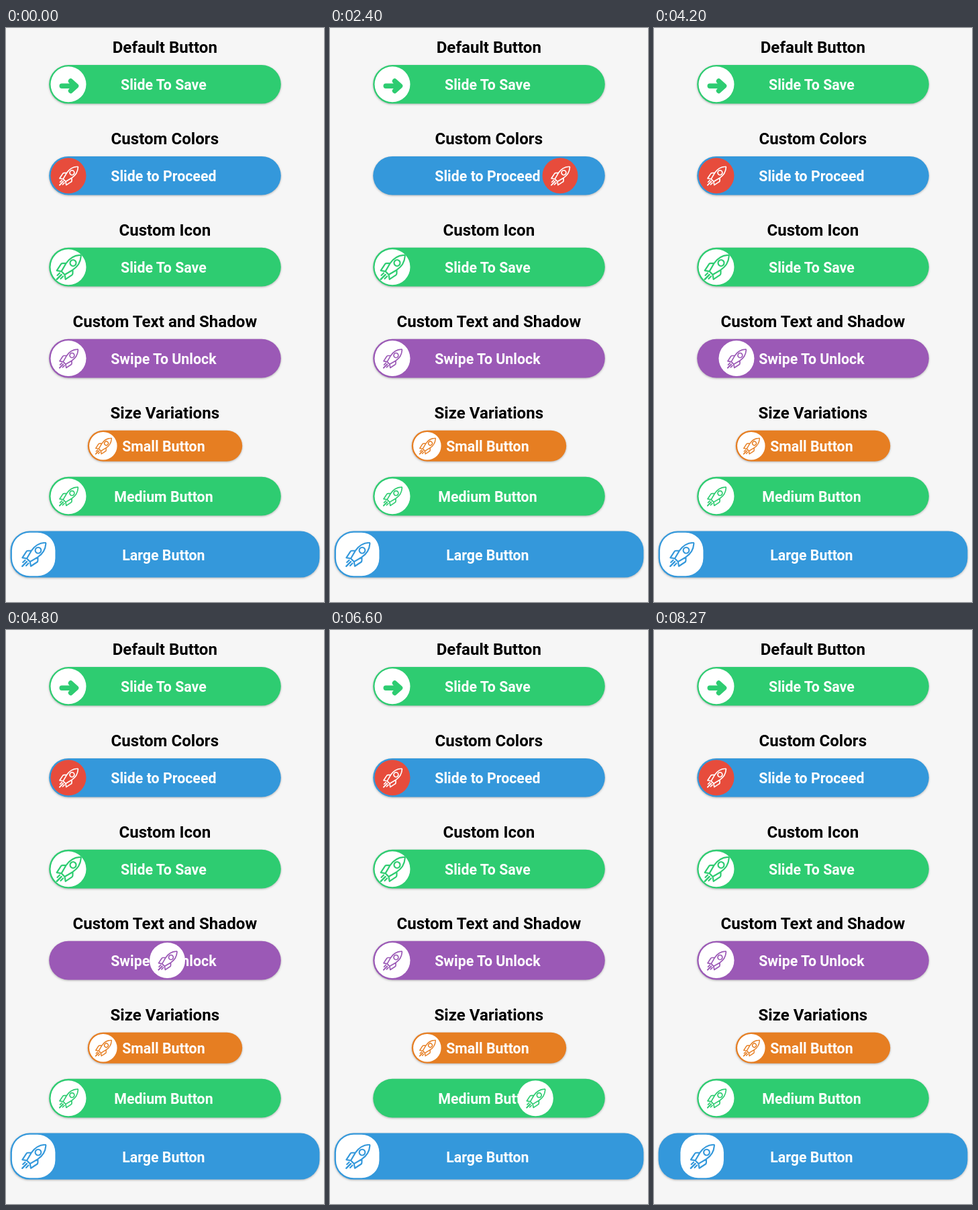
Write an HTML page that moves like this. It is 474 by 854 pixels and loops after 8330 ms.

```html
<!DOCTYPE html>
<html lang="en">
<head>
<meta charset="utf-8">
<title>Slide buttons</title>
<style>
  html, body { margin: 0; height: 100%; overflow: hidden; background: #f6f6f6; }
  svg { display: block; }
  text { font: 700 21.35px Roboto, sans-serif; text-anchor: middle; fill: #fff; }
  .title { font-size: 24.1px; fill: #000; }
  .track { filter: drop-shadow(0 1.5px 1.5px rgba(0, 0, 0, .28)); }
  .icon { fill: none; stroke-linecap: round; stroke-linejoin: round; }
</style>
</head>
<body>
<svg id="stage" width="474" height="854" viewBox="0 0 474 854"></svg>
<script>
const LOOP = 8330, STEP = 1000 / 15;
const UNIT = 1.152, GAP = 20 * UNIT, TITLE = 48 * UNIT;
const GREEN = '#2ecc71', BLUE = '#3498db', PURPLE = '#9b59b6', ORANGE = '#e67e22', RED = '#e74c3c';

const ARROW = '<path stroke-width="7.4" d="M-10.3 2H10M3-5.3L11.1 2L3 9.3"/>';

// half of the upright rocket, mirrored and tilted
const HALF = `<path d="M0-25.3Q.7-25.3 1.2-24.6C7-18 8.5-9 7-1.5L3.5 12H0
  M7-1.5L10.7 2.3Q12 3.6 11.4 5.4L9.2 16L3.5 12M3.5 15.5V20.5M0 15.5V25.3"/>`;
const ROCKET = `<g stroke-width="2.2" transform="rotate(45)">
  <circle cy="-9.2" r="4.5"/>${HALF}<g transform="scale(-1 1)">${HALF}</g></g>`;

// start, drag, hold and back count steps; rest is where the knob waits for the next turn
const buttons = [
  { title: 'Default Button', label: 'Slide To Save', color: GREEN, icon: ARROW, scale: 1,
    start: 8, drag: 7, rest: 22.5 },
  { title: 'Custom Colors', label: 'Slide to Proceed', color: BLUE, knob: RED, ink: '#fff',
    start: 27, drag: 6, back: 4, rest: 45 },
  { title: 'Custom Icon', label: 'Slide To Save', color: GREEN, scale: 1,
    start: 44, hold: 4, reach: .945, rest: 7 },
  { title: 'Custom Text and Shadow', label: 'Swipe To Unlock', color: PURPLE,
    start: 62, hold: 3, back: 4, rest: 7 },
  { title: 'Size Variations', label: 'Small Button', color: ORANGE, w: 200, h: 40, scale: .65,
    start: 78, reach: .97, spring: true },
  { label: 'Medium Button', color: GREEN, start: 95, drag: 6, back: 4 },
  { label: 'Large Button', color: BLUE, w: 400, h: 60, scale: .97,
    start: 112, drag: 7, reach: .94, rest: 30.5 }
];

let top_ = -.3;
function buttonMarkup(b, i) {
  const w = (b.w || 300) * UNIT, h = (b.h || 50) * UNIT, x = 237 - w / 2;
  const size = h - 4 * UNIT, half = size / 2;
  const title = b.title ? `<text class="title" x="236.8" y="${top_ + 37.3}">${b.title}</text>` : '';
  if (b.title) top_ += TITLE;
  const box = `x="${x}" y="${top_}" width="${w}" height="${h}" rx="${Math.min(25 * UNIT, h / 2)}"`;
  b.x = x + h / 2;
  b.y = top_ + h / 2;
  b.span = (w - h) * (b.reach || 1);
  top_ += h + GAP;
  return `${title}<clipPath id="clip${i}"><rect ${box}/></clipPath>
    <rect class="track" ${box} fill="${b.color}"/>
    <text x="234.9" y="${b.y + 8.5}">${b.label}</text>
    <g clip-path="url(#clip${i})"><g class="knob">
      <rect x="${-half}" y="${-half}" width="${size}" height="${size}"
        rx="${Math.min(23 * UNIT, half)}" fill="${b.knob || '#fff'}"/>
      <g class="icon" stroke="${b.ink || b.color}" transform="translate(.5 .4) scale(${b.scale || .76})">${b.icon || ROCKET}</g>
    </g></g>`;
}

function ease(p) {
  p = Math.min(1, Math.max(0, p));
  return p * p * (3 - 2 * p);
}

function offsetAt({ start, span, drag = 5, hold = 2, back = 3, rest = 0, spring }, step, nextStart) {
  if (step >= nextStart && !spring) return 0;
  const s = step - start - drag - hold;
  if (s <= 0) return span * ease((step - start) / drag);
  if (spring) return span * Math.exp(-s / 2) * Math.cos(Math.PI * s / 4);
  return span + (rest - span) * ease(s / back);
}

const stage = document.getElementById('stage');
stage.innerHTML = buttons.map(buttonMarkup).join('');
const knobs = stage.querySelectorAll('.knob');

const begin = performance.now();
function draw(now) {
  const t = Math.max(0, now - begin) % LOOP;
  const step = Math.floor((t + 4) / STEP);
  buttons.forEach((b, i) => {
    const next = buttons[i + 1];
    const offset = offsetAt(b, step, next ? next.start + 1 : Infinity);
    knobs[i].setAttribute('transform', `translate(${b.x + offset} ${b.y})`);
  });
  requestAnimationFrame(draw);
}
draw(begin);
</script>
</body>
</html>
```
